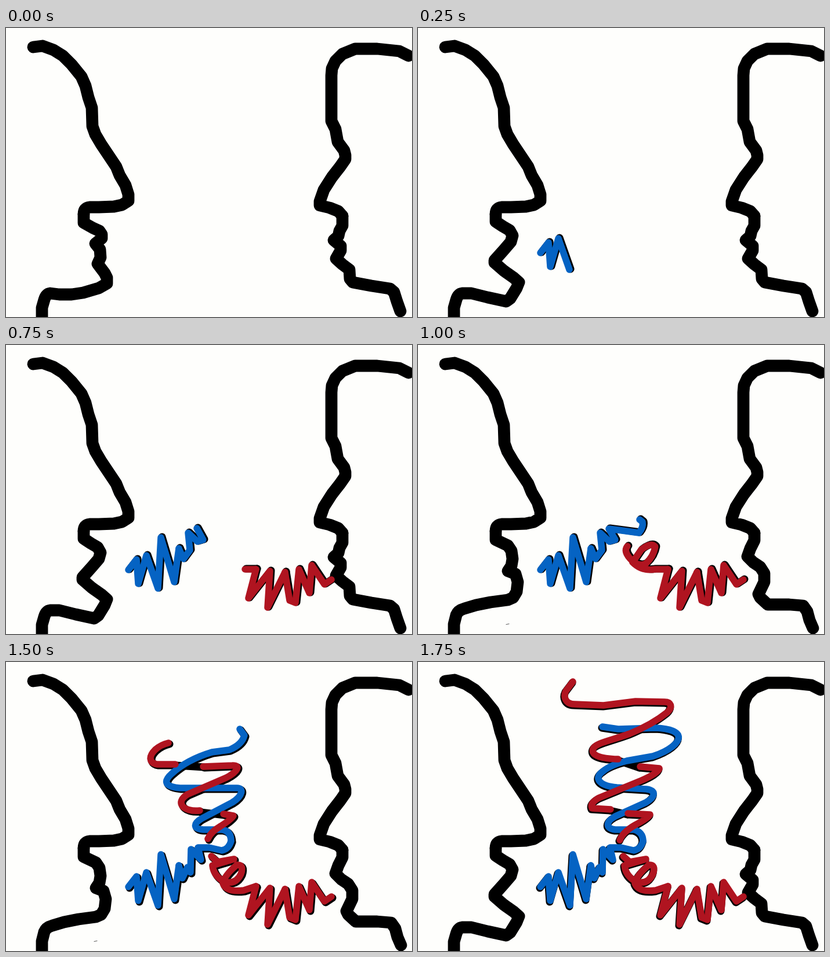
An HTML page without scripts for the animation above (2000 ms loop, 700x500 px).

```html
<!DOCTYPE html>
<html lang="en">
<head>
<meta charset="utf-8">
<title>Two voices</title>
<style>
html, body { margin: 0; width: 100%; height: 100%; overflow: hidden; background: #fefefc; }
svg { display: block; width: 700px; height: 500px; }
path { fill: none; stroke-linecap: round; stroke-linejoin: round; stroke-width: var(--w, 11.5px); }
.face { stroke: #000; stroke-width: 20.8px; }
.blue { stroke: var(--ink, #0563c3); }
.red { stroke: var(--ink, #b01420); }
/* stretches where red passes behind: only the ink layer shows */
.gap { stroke: var(--ink, none); }
.ink { --ink: #000; --w: 13px; transform: translate(var(--x, 2px), var(--y, -1px)); }
.speck { stroke: #555; stroke-width: 1px; }
.step { visibility: hidden; animation: show 2s step-end infinite; animation-delay: calc(var(--i) * 250ms - 2s); }
@keyframes show {
  0% { visibility: visible; }
  12.5%, 100% { visibility: hidden; }
}
</style>
</head>
<body>
<svg viewBox="0 0 700 500">
<defs>
  <!-- mouth poses -->
  <path id="leftShut" class="face" d="M134,322V337L150,346 161,351 165,357V364L154,373 162,383 163,397 158,408 170,424 174,432V442L160,450 133,458 113,461H92L76,459Q69,460 66,470L62,484V510"/>
  <path id="leftHalf" class="face" d="M134,322V337L155,347 161,356 163,370 161,382 155,391 168,396 172,410 170,427 164,437 155,441 125,445 100,450 80,456Q69,459 66,467L62,483V510"/>
  <path id="leftWide" class="face" d="M134,322V335L146,343 158,350 163,359 160,370 148,384 132,402V406L148,420 165,432 174,440 170,450 159,468 152,473 120,466 92,459H76Q69,460 66,470L62,484V510"/>
  <path id="rightShut" class="face" d="M580,325V342L575,351 573,360 565,367 577,377V385L569,399 580,409 592,418 593,434 598,440 630,446 662,451 669,457 674,473 680,490"/>
  <path id="rightHalf" class="face" d="M580,325V338L573,352 568,366 578,376 590,384 597,395V410L587,431 590,437 603,449H640L664,451 671,461 675,476 681,490"/>

  <g id="shut"><use href="#leftShut"/><use href="#rightShut"/></g>
  <g id="wide"><use href="#leftWide"/><use href="#rightShut"/></g>
  <g id="half">
    <use href="#leftHalf"/><use href="#rightHalf"/>
    <path class="speck" d="M152,483.500L157,482.500"/>
  </g>

  <!-- shared scribbles -->
  <path id="zigBlue" class="blue" d="M211,389L225,371 228,413 242,364 262,421 267,333 290,410 298,352"/>
  <path id="zigRed" class="red" d="M561,406L549,414 527,381 523,429 505,388 499,446 489,442 481,393"/>
  <g id="zags">
    <use href="#zigBlue"/><use href="#zigRed"/>
    <path class="red" d="M481,393L451,454 455,391 418,438 431,388"/>
  </g>
  <g id="knot">
    <use href="#zags"/>
    <path class="blue" d="M298,352L304,374 313,355 318,364 319,324 336,342 331,321 350,321 372,326Q384,324 388,310"/>
    <path class="red" d="M431,388L410,395Q380,399 374,383Q376,370 398,351Q411,350 405,367Q396,386 376,380Q358,370 356,352L393,341 365,346 354,336"/>
  </g>

  <g id="v1">
    <path class="blue" d="M211,389L225,371 228,413 242,364 261,418"/>
  </g>
  <g id="v2">
    <use href="#zigBlue"/>
    <path class="blue" d="M298,352L302,378 309,357 312,375"/>
    <path class="red" d="M480,393L483,423 499,449 509,388 516,431 528,380 540,406 552,419 565,404"/>
  </g>
  <g id="v3">
    <use href="#zags"/>
    <path class="blue" d="M298,352L306,370 317,355 314,325 330,340 340,337 329,317"/>
    <path class="red" d="M431,388L412,388"/>
  </g>
  <g id="v4">
    <use href="#zags"/>
    <path class="blue" d="M298,352L306,370 317,355 314,325 330,340 340,337 329,318 352,321 381,325Q389,315 387,306L382,302"/>
    <path class="red" d="M431,388L408,388Q386,392 370,376L385,354Q402,341 409,349Q406,366 393,378Q382,384 370,374Q353,358 361,348"/>
  </g>
  <g id="v5">
    <use href="#knot"/>
    <path class="blue" d="M388,310Q394,297 388,292L340,285C323,285 320,277 335,268S382,255 405,236"/>
    <path class="gap" d="M372,263L333,254"/>
    <path class="red" d="M348,311Q354,297 376,283Q395,270 398,266L372,263M333,254C308,253 298,246 300,239S320,229 342,226"/>
  </g>
  <g id="v6">
    <use href="#knot"/>
    <path class="blue" d="M388,310Q388,292 372,290H340C323,289 322,280 337,271L390,243C408,232 411,217 397,218H300C276,216 269,208 286,193Q312,169 355,156L385,152Q407,143 411,127L403,116"/>
    <path class="gap" d="M375,263L334,258M340,180L292,177"/>
    <path class="red" d="M348,306Q353,294 370,284Q389,272 392,266L375,263M334,257C306,260 290,243 313,229L380,200C399,190 406,178 390,179L340,181M292,177H260C246,174 246,163 257,152Q267,143 280,140"/>
  </g>
  <g id="v7">
    <use href="#knot"/>
    <path class="blue" d="M388,310Q388,294 372,290L340,290C322,288 324,276 340,267L393,243C410,233 411,222 394,220L343,217C312,214 302,201 319,189Q332,178 360,171L405,163C433,154 452,139 449,128Q446,116 410,114L345,116 318,112"/>
    <path class="gap" d="M362,262L332,255M383,181L345,168"/>
    <path class="red" d="M348,308Q353,294 376,281Q397,270 400,264L362,262M332,255L300,253Q296,244 312,235L385,205Q415,192 416,184L383,181M345,168C310,167 298,160 302,150S330,137 365,124Q404,108 430,87C440,77 436,69 425,69L375,68 320,75 270,73C254,73 250,60 255,50L267,34"/>
  </g>
</defs>

<path class="face" d="M47,33L63,31 82,38 98,48 113,63 130,84 137,100 142,120 148,138 149,170 154,184 164,201 178,222 190,240 196,255 206,272 211,288V299L200,306 186,309 160,310H144Q134,311 134,322"/>
<path class="face" d="M694,48L678,40 640,36H602L580,45 568,57 562,70 561,82V161L568,175 572,197 583,212 585,220V227L576,240 562,258 548,280 541,300V307L558,311 573,317 580,325"/>

<g class="step" style="--i:0"><use href="#shut"/></g>
<g class="step" style="--i:1"><use href="#wide"/><use href="#v1" class="ink"/><use href="#v1"/></g>
<g class="step" style="--i:2"><use href="#half"/><use href="#v2" class="ink"/><use href="#v2"/></g>
<g class="step" style="--i:3"><use href="#wide"/><use href="#v3" class="ink"/><use href="#v3"/></g>
<g class="step" style="--i:4"><use href="#half"/><use href="#v4" class="ink"/><use href="#v4"/></g>
<g class="step" style="--i:5;--y:1px"><use href="#wide"/><use href="#v5" class="ink"/><use href="#v5"/></g>
<g class="step" style="--i:6;--y:2px"><use href="#half"/><use href="#v6" class="ink"/><use href="#v6"/></g>
<g class="step" style="--i:7;--x:-1px;--y:2px"><use href="#wide"/><use href="#v7" class="ink"/><use href="#v7"/></g>
</svg>
</body>
</html>
```
